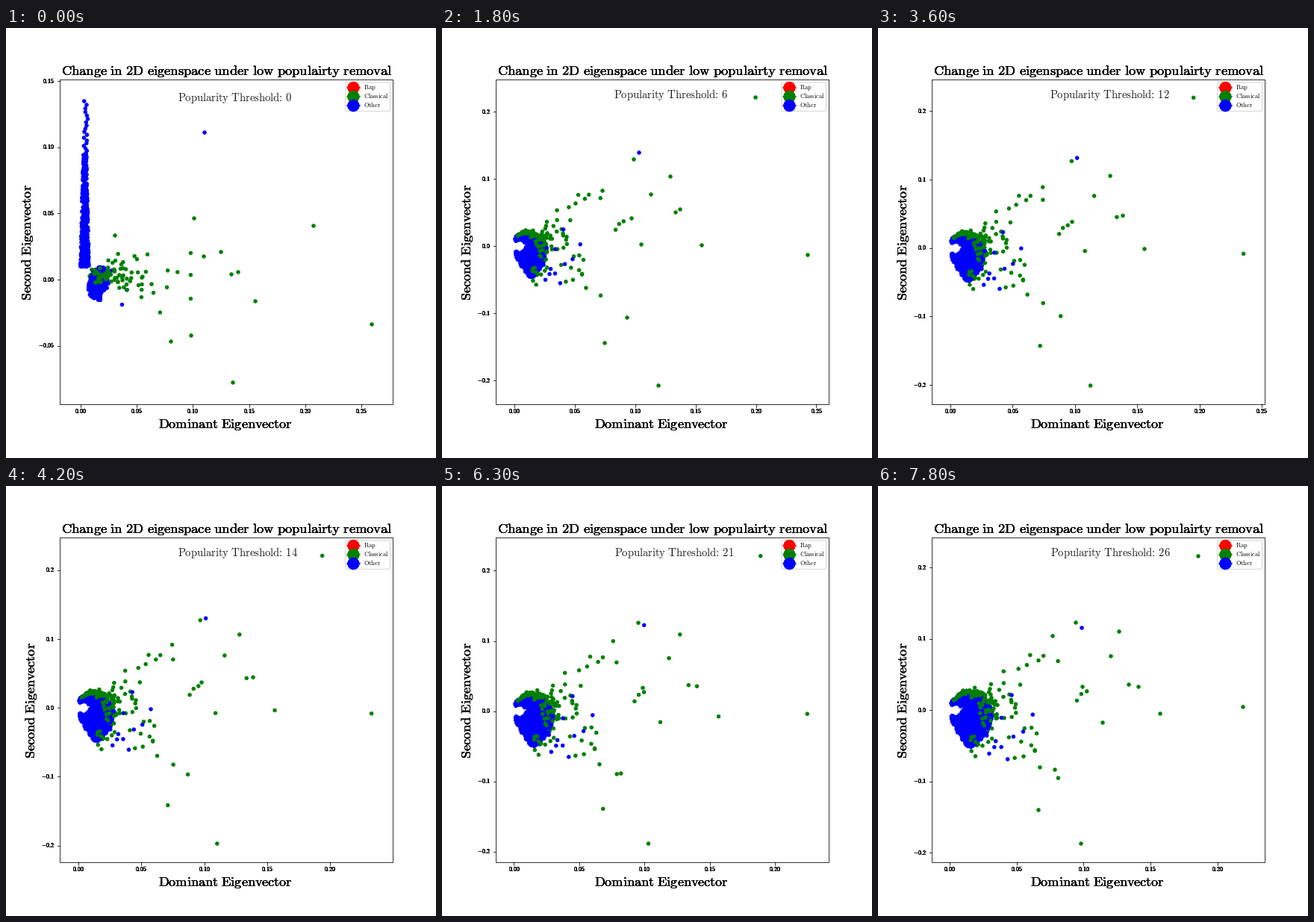
Write a matplotlib script that moves like this. It is 576 px wide and 576 px high and loops after 8 s.

```python
import numpy as np
import matplotlib.pyplot as plt
from matplotlib.animation import FuncAnimation
from matplotlib.patches import Circle, FancyBboxPatch, Rectangle

SIZE, DPI = 576, 72
LEFT, RIGHT, TOP, BOTTOM = 72, 518.4, 69, 504
FRAMES, INTERVAL, FRAMES_PER_STEP = 80, 100, 3
GREEN, BLUE = "green", "blue"
HARD = 5  # passes that darken glyph edges

plt.rcParams["mathtext.fontset"] = "cm"
rng = np.random.default_rng(8)

fig = plt.figure(figsize=(SIZE / DPI, SIZE / DPI), dpi=DPI, facecolor="white")
ax = fig.add_axes([0, 0, 1, 1])
ax.set(xlim=(0, SIZE), ylim=(SIZE, 0))
ax.axis("off")


def roman(text):
    text = text.replace(": ", r"\hspace{-0.2}:\hspace{0.2}").replace(" ", r"\ ")
    return rf"$\mathrm{{{text}}}$"


def label(x, y, text, size, ha="left", va="baseline", passes=1, **style):
    return [ax.text(x, y, roman(text), size=size, ha=ha, va=va, **style)
            for _ in range(passes)]


def scatter(*groups):
    """Draw (points, colour) groups in order; points may carry end positions."""
    points = np.vstack([p for p, _ in groups])
    colors = [color for p, color in groups for _ in p]
    return points, ax.scatter(points[:, 0], points[:, 1], s=20, c=colors)


def wedge(count, x0, y0, reach, slope, drop=0):
    """Points thinning out to the right, fanned around a horizontal line."""
    dx = x0 - 97 + np.minimum(rng.exponential(reach, count), 3.2 * reach)
    return np.column_stack([97 + dx, y0 + dx * rng.normal(drop, slope, count)])


def spread(start):
    """Pair each start with an end that grows and tilts about the origin."""
    dx, dy = (start - (97, 292)).T
    return np.column_stack([start, 97 + 1.25 * dx, 300 + 1.2 * dy + 0.1 * dx])


def crescent(count, low, high, first=-130, last=125):
    """Fill the crowded crescent between relative depths low and high."""
    angles = [-130, -90, -40, 0, 50, 70, 90, 125]
    shapes = [((104, 292), [10, 17, 25, 31, 42, 46, 22, 9]),
              ((104, 300), [10, 16, 37, 48, 53, 54, 23, 10])]
    grid = np.linspace(first, last, 500)
    weight = np.interp(grid, angles, shapes[0][1]) ** 2
    angle = rng.choice(grid, count, p=weight / weight.sum())
    depth = low + (high - low) * rng.random(count) ** 0.8
    direction = np.column_stack([np.cos(np.radians(angle)), np.sin(np.radians(angle))])
    ends = []
    for center, radii in shapes:
        reach = 8 + (np.interp(angle, angles, radii) - 8) * depth
        ends.append(center + direction * reach[:, None])
    return np.hstack(ends)


# Outermost points in pixels: x, y at threshold 6, then x, y at 26.
OUTER = np.array([
    (420, 93, 429, 94), (490, 304, 489, 296), (290, 479, 272, 479),
    (306, 199, 323, 195), (257, 176, 265, 183), (280, 223, 312, 228),
    (319, 243, 349, 269), (313, 247, 336, 266), (348, 291, 378, 305),
    (267, 290, 301, 317), (215, 218, 234, 201), (254, 255, 274, 269),
    (248, 388, 237, 380), (218, 422, 215, 434),
])
OUTER_BLUE = np.array([(264, 167, 273, 190)])

tracks, cloud = scatter(
    (crescent(40, 0.5, 1.2, -90, 60), GREEN),
    (crescent(1100, 0, 1), BLUE),
    (crescent(30, 0.75, 1.15, -105, -25), GREEN),
    (crescent(28, 0.6, 1.3, -60, 70), GREEN),
    (spread(wedge(60, 128, 290, 36, 0.42)), GREEN),
    (spread(wedge(14, 134, 292, 16, 0.4, drop=0.5)), BLUE),
    (OUTER, GREEN), (OUTER_BLUE, BLUE),
)

# The unfiltered state: a blue column and a cloud beside its foot.
rise = rng.random(420) ** 1.25
column = np.column_stack([
    99.5 + 4 * rise + (12 - 8 * rise) * rng.random(420), 320 - 150 * rise])
spire = np.column_stack([rng.normal(107, 1.5, 24), 180 - 82 * np.linspace(0, 1, 24) ** 1.4])
theta, radius = rng.uniform(0, 2 * np.pi, 300), np.sqrt(rng.random(300))
foot = np.column_stack([
    123 + 12 * radius * np.cos(theta) - 4 * radius * np.sin(theta),
    341 + 21 * radius * np.sin(theta)])
FIRST_OUTER = np.array([
    (252, 255), (412, 265), (146, 278), (288, 300), (265, 306), (302, 330),
    (311, 327), (334, 366), (490, 397), (304, 475), (248, 412), (221, 420),
])
_, first_cloud = scatter(
    (column, BLUE), (spire, BLUE), (wedge(40, 112, 335, 14, 0.3), GREEN),
    (foot, BLUE), (wedge(35, 120, 340, 13, 0.4, drop=0.1), BLUE),
    (wedge(40, 118, 332, 20, 0.25), GREEN), (wedge(30, 145, 332, 32, 0.2), GREEN),
    (FIRST_OUTER, GREEN), (np.array([(266, 140)]), BLUE),
)

# Fixed furniture
ax.add_patch(Rectangle((LEFT, TOP), RIGHT - LEFT, BOTTOM - TOP,
                       fill=False, ec="black", lw=0.8, zorder=3))
label(295.5, 62.5, "Change in 2D eigenspace under low populairty removal", 18.45,
      ha="center", passes=HARD)
label(294, 536, "Dominant Eigenvector", 18.15, ha="center", passes=HARD)
second = label(44, 287, "Second Eigenvector", 18.15, ha="right", va="center",
               passes=HARD, rotation=90)
threshold, = label(230, 94, "Popularity Threshold: 0", 14.55, zorder=4, color="0.1")

ax.add_patch(FancyBboxPatch((454.5, 73), 60, 38.3, zorder=5, fc="white", ec="0.8",
                            lw=0.8, boxstyle="round,pad=0,rounding_size=1.6"))
for row, (name, color) in enumerate(
        [("Rap", "red"), ("Classical", GREEN), ("Other", BLUE)]):
    y = 80 + 12 * row
    ax.plot([457, 473.5], [y, y], color=color, lw=1.5, zorder=6)
    ax.add_patch(Circle((465.4, y), 8.2, color=color, lw=0, zorder=6))
    label(479, y + 2.3, name, 8.4, zorder=7)

ticks = []


def draw_ticks(x0, x_step, y0, y_step, y_unit, digits):
    while ticks:
        ticks.pop().remove()
    for i in range(6):
        x = x0 + i * x_step
        if x <= RIGHT:
            ticks.extend(ax.plot([x, x], [BOTTOM, BOTTOM + 3.5], "k", lw=0.8))
            ticks.extend(label(x, 516.3, f"{i * 0.05:.2f}", 7.9,
                               ha="center", passes=HARD))
    for i in range(-2, 4):
        y = y0 - i * y_step
        if TOP <= y <= BOTTOM:
            ticks.extend(ax.plot([LEFT - 3.5, LEFT], [y, y], "k", lw=0.8))
            ticks.extend(label(64.8, y + 2.6, f"{i * y_unit:.{digits}f}", 7.9,
                               ha="right", passes=HARD))


def update(frame):
    step = frame // FRAMES_PER_STEP
    first = step == 0
    cloud.set_visible(not first)
    first_cloud.set_visible(first)
    for text in second:
        text.set_x(39 if first else 44)
    threshold.set_text(roman(f"Popularity Threshold: {step}"))
    if first:
        threshold.set_position((230, 98))
        draw_ticks(99.6, 75.3, 337, 88.6, 0.05, 2)
        return

    progress = (step - 6) / 20
    sway = np.interp(step, [6, 9, 14, 18, 23, 26], [0, -4, 4, 5.5, 8.5, 0])
    points = tracks[:, :2] + (tracks[:, 2:] - tracks[:, :2]) * progress
    x, y = points.T
    tilt = 0.45 + 0.55 * np.clip((x - 97) / 250, 0, 1)
    points[:, 1] += sway * tilt * np.clip(1 - np.abs(y - 300) / 180, 0, 1)
    cloud.set_offsets(points)
    threshold.set_position((230 + max(0, progress), 94))
    draw_ticks(97.3 - 1.1 * progress, 80.8 + 8.8 * progress,
               292 + 8 * progress + 0.5 * sway, 90 + 5.5 * progress, 0.1, 1)


anim = FuncAnimation(fig, update, frames=FRAMES, interval=INTERVAL,
                     init_func=lambda: update(0), repeat=True, repeat_delay=0)
plt.show()
```
